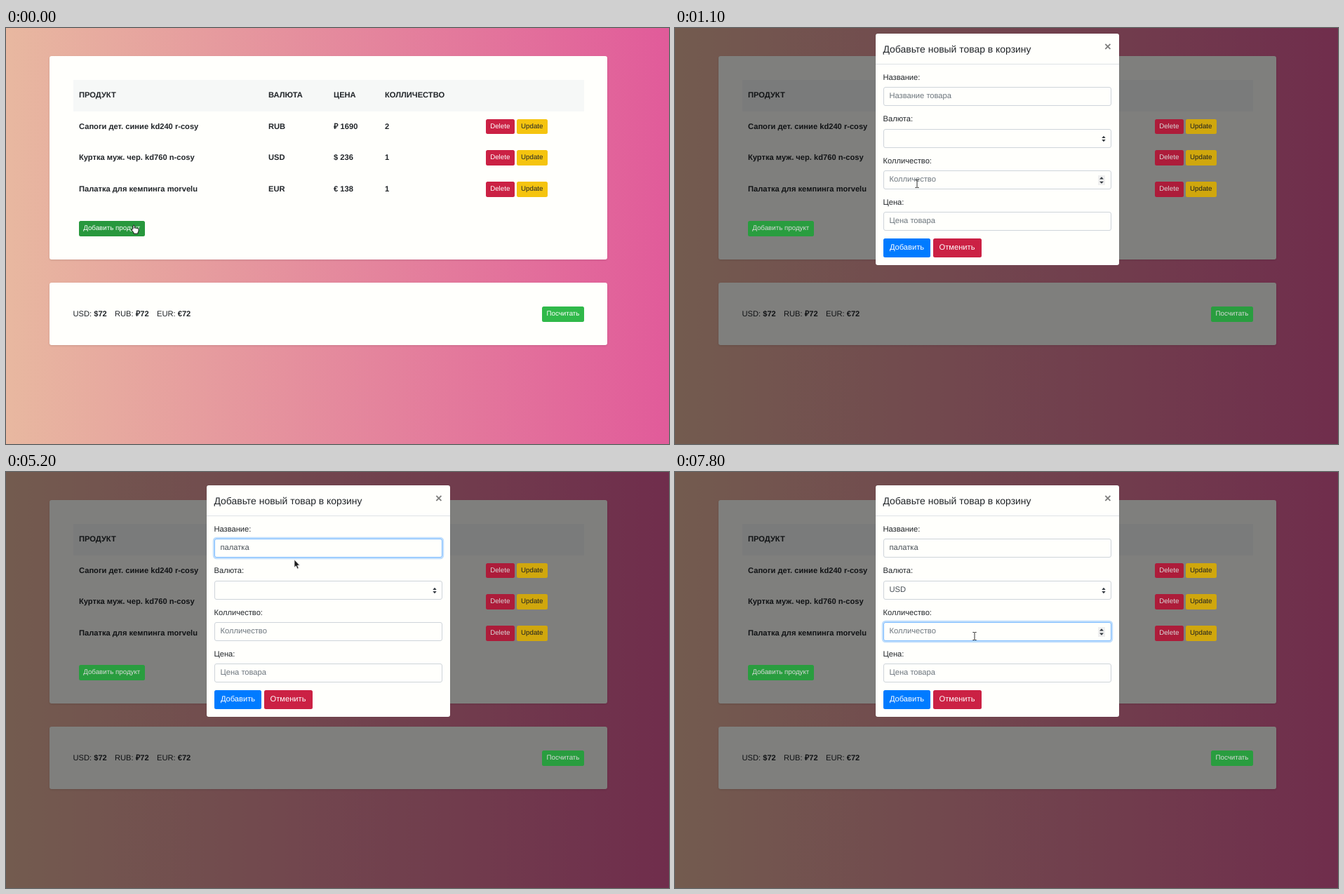
These frames come from a looping animation (945x593 px, 8 s). An HTML page:

```html
<!DOCTYPE html>
<html lang="ru">
<head>
<meta charset="utf-8">
<title>Корзина</title>
<style>
html, body { margin: 0; width: 100%; height: 100%; overflow: hidden; }
#stage {
  position: relative; width: 945px; height: 593px; overflow: hidden;
  background: linear-gradient(to right, #e8b8a0, #e15b9a);
  font: 11.15px/16px "Liberation Sans", Arial, sans-serif;
  color: #212529; text-rendering: geometricPrecision;
}
#stage div, #stage svg { position: absolute; box-sizing: border-box; white-space: pre; }
.card { left: 62px; width: 795px; background: #fffffc; border-radius: 3px; box-shadow: 0 1px 3px rgba(0,0,0,.13); }
.head { left: 95.5px; top: 73.5px; width: 728.5px; height: 45px; background: #f6f8f7; }
.bold, b { font-weight: 700; }
#shade { inset: 0; background: #000; }
.btn { color: #fff; text-align: center; border-radius: 2.5px; }
.small { font-size: 9.76px; height: 21.5px; line-height: 21.5px; }
.green { background: #30b94a; }
.red { background: #cb2144; }
.yellow { background: #f5c40f; color: #212529; }
.blue { background: #007bff; }
#modal { left: 286px; top: 19px; width: 347px; height: 330px; background: #fffffc; border-radius: 3px; box-shadow: 0 0 1px rgba(0,0,0,.35); }
.title { font-size: 13.94px; }
.line { left: 0; top: 43px; width: 347px; height: 1px; background: #dee2e6; }
.close { font-size: 16.7px; font-weight: 700; color: #7f7f7e; }
.field { left: 10.5px; width: 325.5px; height: 27px; border: 1px solid #ced4da; border-radius: 3px; background: #fffffc; padding-left: 8px; line-height: 25px; color: #495057; }
.hint { color: #6c757d; }
.caret { display: inline-block; width: 1px; height: 13px; margin-right: -1px; background: #222; vertical-align: middle; }
#list { left: 11px; top: 162px; width: 325px; height: 44px; background: #fffffc; border: 1px solid #65a4dc; box-shadow: 0 3px 6px rgba(0,0,0,.28); }
#list div { left: 0; width: 323px; height: 14px; line-height: 14px; padding-left: 8px; color: #495057; }
#list .on { background: #2490f0; color: #fff; }
#cursor { left: 0; top: 0; overflow: visible; }
</style>
</head>
<body>
<div id="stage"></div>
<script>
const stage = document.getElementById('stage');

function add(parent, cls, html = '', css = {}) {
  const el = document.createElement('div');
  el.className = cls;
  el.innerHTML = html;
  for (const key in css) el.style[key] = typeof css[key] === 'number' ? css[key] + 'px' : css[key];
  parent.appendChild(el);
  return el;
}
const label = (parent, x, mid, html, cls = '') => add(parent, cls, html, { left: x, top: mid - 8 });
const arrows = (x, half, gap, back) =>
  `<svg width="10" height="14" style="left:${x}px;top:6px">` +
  (back ? '<rect width="10" height="14" fill="#efefef"/>' : '') +
  `<path fill="#343a40" d="M${5 - half} ${7 - gap}h${half * 2}l${-half} -3.2zM${5 - half} ${7 + gap}h${half * 2}l${-half} 3.2z"/></svg>`;

// Page
add(stage, 'card', '', { top: 40.4, height: 289.6 });
add(stage, 'card', '', { top: 363.4, height: 88.6 });
add(stage, 'head');
const columns = [104, 374, 467, 540];
const rows = [
  ['ПРОДУКТ', 'ВАЛЮТА', 'ЦЕНА', 'КОЛЛИЧЕСТВО'],
  ['Сапоги дет. синие kd240 r-cosy', 'RUB', '₽ 1690', '2'],
  ['Куртка муж. чер. kd760 n-cosy', 'USD', '$ 236', '1'],
  ['Палатка для кемпинга morvelu', 'EUR', '€ 138', '1']
];
rows.forEach((row, i) => row.forEach((s, j) => label(stage, columns[j], 96 + i * 44.6, s, 'bold')));
label(stage, 95.5, 408, 'USD: <b>$72</b>');
label(stage, 155, 408, 'RUB: <b>₽72</b>');
label(stage, 215, 408, 'EUR: <b>€72</b>');

const shade = add(stage, '');
shade.id = 'shade';

const pageButtons = [];
function smallButton(x, y, w, text, color) {
  const b = add(stage, 'btn small ' + color, text, { left: x, top: y, width: w });
  pageButtons.push(b);
  return b;
}
for (let i = 0; i < 3; i++) {
  const y = 129.8 + i * 44.6;
  smallButton(684, y, 40.5, 'Delete', 'red');
  smallButton(727.5, y, 44.5, 'Update', 'yellow');
}
const addButton = smallButton(104, 275, 93.5, 'Добавить продукт', 'green');
smallButton(764, 397, 60, 'Посчитать', 'green');

// Modal form
const modal = add(stage, '');
modal.id = 'modal';
label(modal, 10.5, 21.7, 'Добавьте новый товар в корзину', 'title');
label(modal, 326, 19, '×', 'close');
add(modal, 'line');
const fields = ['Название:', 'Валюта:', 'Колличество:', 'Цена:'].map((name, i) => {
  label(modal, 10.5, 63 + i * 59.3, name);
  return add(modal, 'field', '', { top: 76.2 + i * 59.3 });
});
const [nameBox, currencyBox, countBox, priceBox] = fields.map(f => add(f, '', '', { left: 8, top: 0 }));
priceBox.innerHTML = '<span class="hint">Цена товара</span>';
fields[1].insertAdjacentHTML('beforeend', arrows(308, 2.7, 1, false));
fields[2].insertAdjacentHTML('beforeend', arrows(305, 3, 1.6, true));
const spinner = fields[2].querySelector('svg');
add(modal, 'btn blue', 'Добавить', { left: 11, top: 292, width: 67, height: 27, lineHeight: '27px' });
add(modal, 'btn red', 'Отменить', { left: 81.5, top: 292, width: 69, height: 27, lineHeight: '27px' });

const list = add(modal, '');
list.id = 'list';
const options = ['RUB', 'USD', 'EUR'].map((s, i) => add(list, '', s, { top: i * 14 }));

// Pointer
stage.insertAdjacentHTML('beforeend', `<svg id="cursor" width="1" height="1">
<path data-kind="arrow" fill="#1b1b1b" stroke="#e8e8e8" stroke-width=".8" d="M0 0V11l2.4-2.2 1.8 4.2 1.9-.8-1.8-4.1H7.6Z"/>
<path data-kind="beam" fill="none" stroke="#333" stroke-width="1" d="M-2.6-5.5H-.8L0-4.8.8-5.5H2.6M0-4.8V4.8M-2.6 5.5H-.8L0 4.8.8 5.5H2.6"/>
<path data-kind="hand" fill="#fff" stroke="#111" stroke-width="1" stroke-linejoin="round" d="M-3-.5V-4.7a1.1 1.1 0 0 1 2.2 0V-1.8q1.1-.8 2 .2 1.1-.7 1.9.3 1.8-.5 1.9 1V2.6L4 4.6V6.2H-2V4.8L-4.8 1Q-5.4-.8-3-.5Z"/>
</svg>`);
const cursor = document.getElementById('cursor');
const shapes = [...cursor.children];

const LOOP = 8000;
const WORD = 'палатка';
const typedAt = [2600, 3600, 3800, 4000, 4300, 4400, 4600];
const path = [
  [0, 184, 287, 'hand'], [300, 184, 287, 'hand'], [400, 183, 288, 'hand'], [600, 185, 287, 'hand'],
  [700, 206, 279, 'arrow'], [1000, 345, 222, 'arrow'], [1100, 345, 222, 'beam'],
  [1200, 372, 190, 'arrow'], [1400, 410, 130, 'arrow'], [1500, 400, 116, 'beam'],
  [1600, 411, 115, 'beam'], [2100, 411, 115, 'beam'], [2200, 411, 121, 'beam'],
  [2300, 411, 121, 'beam'], [2400, 411, 125, 'arrow'], [5200, 411, 125, 'arrow'],
  [5900, 378, 168, 'arrow'], [6000, 375, 173, 'arrow'], [6200, 371, 207, 'arrow'],
  [6300, 371, 207, 'arrow'], [6400, 371, 201, 'arrow'], [6600, 371, 201, 'arrow'],
  [6900, 418, 226, 'beam'], [7000, 427, 234, 'beam'], [LOOP, 427, 234, 'beam']
];

const clamp = v => Math.max(0, Math.min(1, v));
const within = (t, a, b) => t >= a && t < b;
const show = (el, on) => { el.style.display = on ? '' : 'none'; };
const caret = on => on ? '<span class="caret"></span>' : '';

function focus(el, level) {
  el.style.borderColor = level ? '#80bdff' : '';
  el.style.boxShadow = level ? `0 0 0 ${2.2 * level}px rgba(0,123,255,.25)` : '';
}

function moveCursor(t) {
  let i = 0;
  while (i < path.length - 2 && path[i + 1][0] <= t) i++;
  const [t0, x0, y0, kind] = path[i], [t1, x1, y1] = path[i + 1];
  const u = (t - t0) / (t1 - t0);
  cursor.style.transform = `translate(${x0 + (x1 - x0) * u}px,${y0 + (y1 - y0) * u}px)`;
  shapes.forEach(s => show(s, s.dataset.kind === kind));
}

function render(t) {
  const fade = clamp((t - 930) / 160);
  const slide = 1 - clamp((t - 930) / 330);
  shade.style.opacity = fade * 0.5;
  pageButtons.forEach(b => { b.style.filter = fade ? `brightness(${1 - fade * 0.15})` : ''; });
  addButton.style.background = t < 1100 ? '#28983d' : '';
  addButton.style.boxShadow = within(t, 600, 1100) ? '0 0 0 2px rgba(40,167,69,.45)' : '';

  show(modal, fade > 0);
  modal.style.opacity = fade;
  modal.style.transform = slide ? `translateY(${-34.9 * slide ** 1.6}px)` : '';

  const count = typedAt.filter(at => at <= t).length;
  const nameCaret = within(t, 2400, 3200) || within(t, 3600, 5200);
  nameBox.innerHTML = count
    ? WORD.slice(0, count) + caret(nameCaret)
    : caret(nameCaret) + '<span class="hint">Название товара</span>';
  currencyBox.textContent = t >= 6600 ? 'USD' : '';
  countBox.innerHTML = caret(within(t, 7400, 7800)) + '<span class="hint">Колличество</span>';
  show(spinner, within(t, 1100, 1200) || t >= 6900);

  focus(fields[0], within(t, 1900, 6100) ? (t < 2200 || t >= 6000 ? 0.6 : 1) : 0);
  focus(fields[1], within(t, 6000, 7000) ? 1 : 0);
  focus(fields[2], t >= 7000 ? (t < 7200 ? 0.6 : 1) : 0);

  show(list, within(t, 6000, 6600));
  options[1].className = t >= 6200 ? 'on' : '';
  moveCursor(t);
}

function tick() {
  const t = performance.now() % LOOP;
  render(Math.floor(t / 100) * 100);
  requestAnimationFrame(tick);
}
tick();
</script>
</body>
</html>
```
